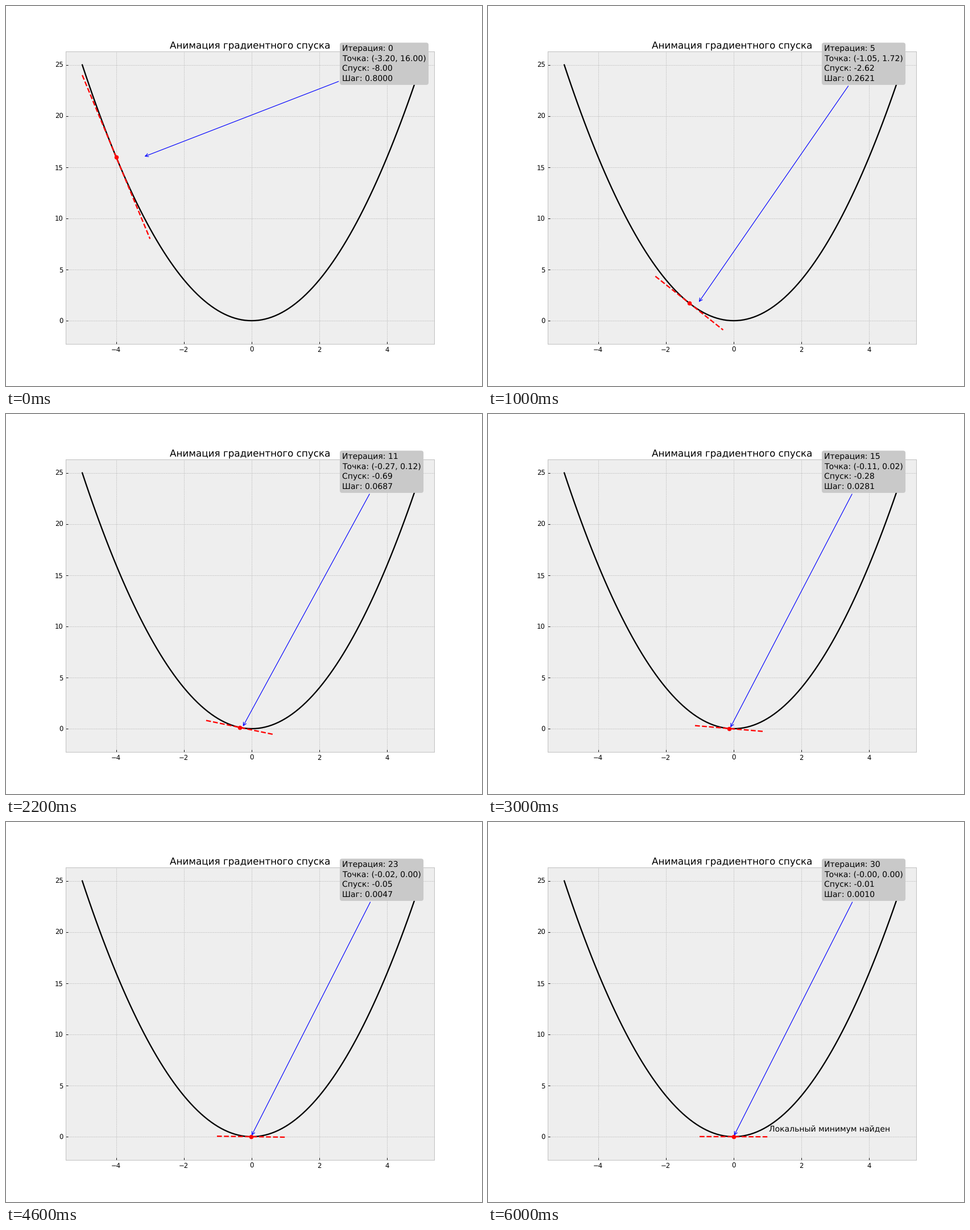
A matplotlib script that plays this animation: 837x669 px, repeating every 6200 ms.

```python
import numpy as np
import matplotlib.pyplot as plt
from matplotlib.animation import FuncAnimation

W, H = 837, 669
DPI = H / 8
STEPS = 31
START, RATE = -4.0, 0.1

plt.rcParams.update({
    "font.family": "DejaVu Sans",
    "text.hinting": "none",
    "axes.facecolor": "#eeeeee",
    "axes.edgecolor": "#bcbcbc",
    "axes.grid": True,
    "axes.titlesize": "x-large",
    "axes.titlepad": 5.2,
    "grid.color": "#b2b2b2",
    "grid.linestyle": "--",
    "grid.linewidth": 0.5,
    "lines.linewidth": 2.0,
    "lines.markeredgewidth": 0.5,
    "xtick.direction": "in",
    "ytick.direction": "in",
})


def f(x):
    return x ** 2


def slope(x):
    return 2 * x


def point(n):
    return START * (1 - 2 * RATE) ** n


def tangent(x):
    xs = np.array([x - 1, x + 1])
    return xs, f(x) + slope(x) * (xs - x)


# the tiny surplus keeps the pixel width from rounding down
fig, ax = plt.subplots(figsize=((W + 0.001) / DPI, 8), dpi=DPI)
ax.set_title("Анимация градиентного спуска")

xs = np.arange(-5, 5, 0.1)
ax.plot(xs, f(xs), "k")
line, = ax.plot([], [], "r--")
dot, = ax.plot([], [], "ro")

# limits hold the curve and every tangent, with the usual 5 % margin
low = min(tangent(point(n))[1].min() for n in range(STEPS))
for set_lim, a, b in ((ax.set_xlim, xs[0], xs[-1]), (ax.set_ylim, low, 25)):
    pad = 0.05 * (b - a)
    set_lim(a - pad, b + pad)

info = ax.annotate(
    "", xy=(START, f(START)), xytext=(0.75, 0.9), textcoords="axes fraction",
    fontsize=12, linespacing=1.37,
    bbox=dict(boxstyle="round,pad=0.3", fc="#c9c9c9", ec="none"),
    arrowprops=dict(arrowstyle="->", color="blue", lw=1))
done = ax.text(0.6, 0.1, "Локальный минимум найден", fontsize=12,
               transform=ax.transAxes, visible=False)


def update(n):
    x = point(n)
    step = RATE * slope(x)
    line.set_data(*tangent(x))
    dot.set_data([x], [f(x)])
    info.xy = (x - step, f(x))
    info.set_text(f"Итерация: {n}\n"
                  f"Точка: ({x - step:.2f}, {f(x):.2f})\n"
                  f"Спуск: {slope(x):.2f}\n"
                  f"Шаг: {abs(step):.4f}")
    done.set_visible(abs(step) < 0.001)
    return line, dot, info, done


anim = FuncAnimation(fig, update, frames=STEPS, interval=200,
                     repeat=True, repeat_delay=0, blit=False)
plt.show()
```
